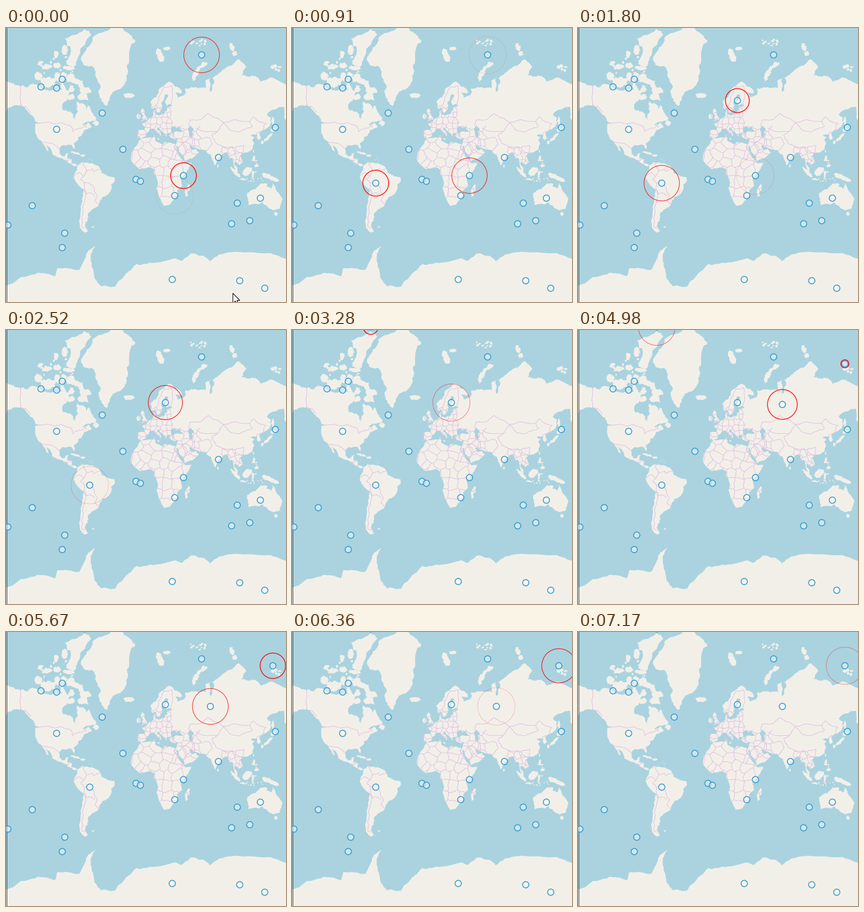
Animation, 448 px wide and 438 px high, one loop 7270 ms. Source, as a matplotlib script:

```python
import numpy as np
import matplotlib.pyplot as plt
from matplotlib.animation import FuncAnimation
from matplotlib.collections import LineCollection, PolyCollection
from matplotlib.patches import Circle, Polygon
from matplotlib.path import Path
from matplotlib.tri import Triangulation

W, H, DPI = 448, 438, 100
PX = 72 / DPI                      # one pixel in points
LOOP, FRAMES = 7270, 84
STEP = LOOP / FRAMES
PULSE = 2730                       # life of one ring in ms

SEA, LAND, BORDER, RING, EDGE = "#aad3df", "#f2efe9", "#dcb6e0", "#3399cc", "#4a4a4a"
rng = np.random.default_rng(4)
lands, lines = [], []


def project(*coords):
    """Web Mercator, flat lon/lat pairs to pixels."""
    lon, lat = np.array(coords, float).reshape(-1, 2).T
    y = np.arcsinh(np.tan(np.radians(lat)))
    return np.column_stack([224 + lon * 512 / 360, 231.5 - y * 256 / np.pi])


def roughen(p, amp, rounds=3):
    """Midpoint displacement along a polyline."""
    for _ in range(rounds):
        d = np.diff(p, axis=0)
        size = np.hypot(*d.T)
        push = rng.normal(0, amp, len(d)) * np.minimum(size, 12) / np.maximum(size, 1e-6)
        mid = (p[:-1] + p[1:]) / 2 + np.column_stack([-d[:, 1], d[:, 0]]) * push[:, None]
        out = np.empty((len(p) + len(mid), 2))
        out[::2], out[1::2] = p, mid
        p = out
    return p


def land(*coords, amp=.08):
    p = project(*coords)
    lands.append(roughen(np.vstack([p, p[:1]]), amp))


def blob(x, y, rx, ry, tilt=0):
    """Ragged ellipse in pixels."""
    a = np.linspace(0, 2 * np.pi, 10)
    r = rng.uniform(.85, 1.15, 10)
    r[-1] = r[0]
    u, v, t = rx * r * np.cos(a), ry * r * np.sin(a), np.radians(tilt)
    p = np.column_stack([x + u * np.cos(t) - v * np.sin(t), y + u * np.sin(t) + v * np.cos(t)])
    return roughen(p, .14, 2)


def isles(*rows):
    lands.extend(blob(*row) for row in rows)


def scatter(x, y, sx, sy, n, size):
    """Archipelago of small islands."""
    for _ in range(n):
        rx, ry = rng.uniform(.4, 1, 2) * size
        lands.append(blob(x + rng.uniform(-sx, sx), y + rng.uniform(-sy, sy), rx, ry))


def border(*coords):
    lines.append(roughen(project(*coords), .07))


def mesh(x0, x1, y0, y1, step):
    """Country-like cells: Voronoi edges of a jittered grid."""
    gx, gy = np.meshgrid(np.arange(x0, x1 + step, step), np.arange(y0, y1 + step, step))
    x, y = (g.ravel() + rng.uniform(-.38, .38, g.size) * step for g in (gx, gy))
    tri = Triangulation(x, y)
    (ax_, bx, cx), (ay, by, cy) = x[tri.triangles].T, y[tri.triangles].T
    a, b, c = ax_ ** 2 + ay ** 2, bx ** 2 + by ** 2, cx ** 2 + cy ** 2
    d = 2 * (ax_ * (by - cy) + bx * (cy - ay) + cx * (ay - by))
    hubs = np.column_stack([(a * (by - cy) + b * (cy - ay) + c * (ay - by)) / d,
                            (a * (cx - bx) + b * (ax_ - cx) + c * (bx - ax_)) / d])
    ok = np.all((hubs > (x0, y0)) & (hubs < (x1, y1)), axis=1)
    for i, row in enumerate(tri.neighbors):
        for j in row[row > i]:
            if ok[i] and ok[j]:
                lines.append(roughen(hubs[[i, j]], .09))


def on_land(segments):
    mid = segments.mean(axis=1)
    inside = np.zeros(len(mid), bool)
    for p in lands:
        inside |= Path(p).contains_points(mid)
    return segments[inside]


# North America, northern then southern half
land(-170, 66, -163, 69, -156.6, 71.3, -136, 68.9, -128, 70.3, -115, 67.9, -108, 67.4, -98, 67.8,
     -94.5, 68, -96, 70, -94.5, 71.9, -90.5, 68.6, -87.5, 67.4, -85.5, 69.7, -81.5, 69.4, -81.5, 67,
     -87, 65.6, -94.5, 60.5, -93, 57.3, -82.5, 55.2, -82, 52.9, -79.5, 51.3, -79.5, 54.5,
     -76.7, 56.5, -78, 62.4, -70, 61, -67.5, 58.3, -64.5, 60.3, -62, 57.5, -55.7, 52.2, -59, 50.2,
     -67, 49.5, -75, 45, -122.5, 48.5, -130, 54.5, -136, 58.5, -145, 60.3, -151, 59.3, -154, 59,
     -163, 54.6, -157.3, 58.7, -170, 60, amp=.11)
land(-71, 47, -65, 49.2, -61, 45.8, -70, 43, -70, 41.7, -76, 37.5, -76, 35, -81, 31.5, -80.2, 25.3,
     -82.7, 28, -84, 30, -89.3, 29.5, -94, 29.6, -97.3, 27, -97.5, 21.5, -94.5, 18.2, -91, 18.8,
     -90.2, 21, -87, 21.3, -88.6, 15.9, -83.3, 15, -83.5, 11, -77.3, 8.5, -80.2, 7.4, -85.7, 10.5,
     -94, 16, -105.5, 20.4, -105.5, 22.8, -113.1, 31.4, -109.6, 23.2, -112, 25, -117.2, 32.8,
     -122, 36.8, -124.3, 40.4, -124.4, 48.3, -95, 50)
# Greenland, Ellesmere, Baffin
land(-73, 78.2, -68, 76, -58, 75.5, -55, 72, -51, 69.5, -53.7, 67, -51.5, 64, -44, 59.9, -40, 65,
     -24, 70, -20, 74.5, -18, 80, -12, 81.5, -32, 83.6, -60, 82, -67, 80.2, amp=.11)
land(-89.5, 76.4, -79, 76.3, -75, 78.6, -61.5, 82.4, -70, 83.1, -91, 81.8, -85, 79, amp=.14)
land(-82, 73.7, -71, 71.3, -61.5, 66.6, -67, 66, -64.8, 62.7, -72, 62.9, -78, 64.4, -73, 66.5,
     -79, 70, -89, 70.8, -86, 73.7, amp=.15)
# South America
land(-77.3, 8.5, -71.7, 12, -62, 10.7, -51.5, 4.5, -50, 0, -44.5, -2.6, -35.2, -5.5, -35, -9,
     -39, -13.5, -39.5, -19, -42, -23, -48.5, -26, -53.5, -34.3, -57, -36.5, -62, -39, -65.3, -42,
     -65.8, -47.5, -69, -51, -65.3, -54.8, -69, -55.5, -74, -52.5, -75.3, -47, -73.5, -40,
     -71.5, -31, -70.3, -18.4, -76, -14, -81.2, -5.5, -80.5, -1, -77.5, 3.5)
# Scandinavia, western and central Europe
land(31, 70, 25.8, 71, 15, 68.3, 11, 64.3, 5, 62, 5.5, 58.7, 8, 58.1, 10.5, 59.2, 13, 55.4, 16.3, 56.8,
     18.8, 60, 17.5, 62, 22, 65.8, 25, 65.3, 21.4, 62, 23, 59.9, 33, 60.3, 33, 67)
land(30, 59.9, 23.5, 59.2, 24, 57.3, 21, 57, 21, 55, 14.2, 53.9, 9.8, 55, 10.5, 57.6, 8.2, 56.5,
     8.5, 53.9, 4.5, 52.3, 1.6, 50.4, -1.6, 49.2, -4.7, 48.4, -1.2, 46, -1.6, 43.4, -9, 43.3, -9.3, 38.7,
     -8.9, 37, -5.5, 36.1, -1, 37.5, 3.2, 42, 3.5, 43.3, 8.8, 44.4, 15.6, 40, 15.8, 38, 17, 40,
     12.4, 44.3, 13.5, 45.7, 19.3, 41.5, 22.6, 36.6, 23.5, 40.3, 28.5, 41.2, 28, 43.3, 31, 46.3,
     34, 44.5, 39, 47, 38, 44.7, 41.5, 41.7, 50, 44, 50, 60)
land(-5.5, 50.1, 1.3, 51.2, 1.5, 52.7, -1.8, 55.5, -2.2, 57.5, -4, 58.6, -6, 56.6, -3, 54, -4.7, 52.4, -3, 51.3)
# Northern, southern and eastern Asia
land(29, 69.8, 40, 67.4, 40, 66.3, 33, 66.6, 36, 64, 44, 66.1, 44, 68.4, 53.5, 68.8, 67.5, 68.5, 67, 71.5,
     72.8, 72.8, 72, 67, 74.5, 68, 74.5, 72.3, 81, 73.6, 87, 75, 104, 77.7, 113, 75.8, 107, 73.3,
     123, 73, 129, 71, 140, 72.5, 165, 69, 165, 61, 135, 55.5, 100, 48, 50, 48, 30, 55, amp=.11)
land(41.5, 41.7, 33, 42, 26.5, 39.8, 27.5, 36.8, 36, 36.5, 34.5, 31.3, 32.5, 30, 34.2, 27.8, 35, 29.5,
     39.2, 21, 43.4, 12.7, 52, 16, 59.7, 22.5, 56.3, 26, 51.5, 24.6, 48, 29.5, 51, 29, 57, 26.5, 61.5, 25.1,
     66.7, 25, 70, 21, 72.8, 20, 74.4, 14.5, 77.5, 8.1, 80, 13, 82, 16.7, 87, 21.3, 91.5, 22.4,
     100, 30, 95, 52, 50, 55)
land(91.5, 22.4, 94.3, 16, 97, 16.9, 98.4, 9, 101.3, 2.9, 103.8, 1.4, 103, 5.5, 99.3, 10, 100.3, 13.3,
     104.9, 8.6, 109.2, 12, 106, 18.7, 107.5, 21.3, 113.5, 22.3, 119.8, 25.8, 121.9, 31, 119.3, 35,
     122.2, 37, 118, 39, 124.5, 39.7, 126.5, 34.4, 129.3, 36, 127.5, 39.6, 135.5, 44.3, 140.3, 48.5,
     141, 52.5, 136, 54.7, 143, 59.3, 155.5, 59.3, 156.5, 51, 165, 62, 130, 62, 90, 55, 85, 30)
# Africa, Australia, Antarctica
land(-6, 35.8, 3, 36.8, 10, 37.3, 10.5, 34, 19.5, 30.4, 21, 32.7, 32, 31.2, 35.5, 24, 37.3, 19, 43, 12.2,
     44.5, 10.4, 51.2, 11.9, 48, 4.5, 39, -5.5, 40.5, -14.5, 35, -19.5, 35.5, -23.5, 32.6, -27, 27, -33.6,
     20, -34.8, 18.2, -32, 15, -26.5, 11.9, -17.5, 13.7, -11, 9, -1, 9.5, 3.8, 4.3, 6.3, -7.5, 4.4,
     -13.2, 8.8, -17.3, 14.5, -16.5, 22, -10, 29.8, amp=.05)
land(114, -22, 115.5, -34, 124, -33, 131, -31.5, 136, -34.5, 143.5, -38.8, 150, -37.5, 153.4, -28,
     146.5, -19, 142.5, -10.8, 140.8, -17.4, 135.5, -15, 136.5, -12.2, 131, -12, 127, -14, 122, -18.2)
land(-165, -78, -150, -77, -140, -75.2, -120, -74, -102, -75, -100, -72.5, -75, -73, -68, -68.5,
     -65, -65.5, -57, -63.3, -62, -67, -61, -72, -58, -75.5, -50, -77.7, -35, -77.8, -20, -73.7,
     -11, -71, 20, -70, 33, -68.8, 39, -69.8, 50, -66.8, 65, -67.8, 72, -70, 82, -67.3, 100, -66,
     140, -66.6, 165, -70, 165, -82, -165, -82, amp=.06)

# Islands: x, y, half axes, tilt
isles((67, 86, 13, 9), (52, 77, 7, 7), (66, 62, 9, 4, -10), (82, 78, 5, 7), (92, 76, 5, 6), (82, 60, 6, 5),
      (101, 64, 10, 4), (94, 36, 5, 8), (80, 42, 4, 6), (55, 56, 5, 3, -30), (104, 110, 6, 5, -40),
      (246, 43, 5, 11, -20), (257, 33, 6, 3), (303, 75, 4, 10, 20), (313, 62, 11, 3.5, -35),
      (361, 30, 4, 7, -15), (366, 41, 4, 4))
isles((197, 108, 9, 4), (212, 141, 3.5, 4.5), (144, 152, 5, 4), (111, 200, 8, 1.5, 17), (123, 204, 4, 2),
      (237, 174, 1.2, 3), (244, 177, 2, 1.2), (139, 318, 2, 1), (290, 259, 3, 10, 17), (339, 221, 1.5, 2.4),
      (396, 197, 1, 2.3), (427, 149, 1.6, 8), (427, 163, 4, 3), (419, 175, 9, 2.4, -42), (410, 183, 2, 3))
isles((397, 208, 2, 5), (401, 220, 3.5, 2.5), (367, 231, 11, 2.8, 47), (380, 242, 7, 1.3, 6),
      (386, 229, 8.5, 6, -45), (395, 234, 2, 5.5), (398, 230, 4, 1), (423, 239, 15, 4, 24), (432, 297, 3, 3))
scatter(82, 65, 26, 22, 24, 2.5)
scatter(306, 24, 15, 5, 14, 2.5)
scatter(429, 63, 9, 5, 7, 3.5)
scatter(398, 214, 4, 4, 6, 1.5)
scatter(400, 242, 16, 4, 12, 1.5)
scatter(136, 208, 5, 6, 6, .7)
scatter(265, 172, 4, 4, 6, .8)

# Long frontiers
border(-123, 49, -95, 49, -84.5, 46.5, -82.5, 42, -75, 45, -71.5, 45, -68, 47.3, -67, 45)
border(-141, 69.6, -141, 60.2, -135.5, 59.7, -130, 55.9)
border(-117, 32.5, -107, 31.6, -102.5, 29.7, -97.2, 25.9)
border(-71.5, 12, -67, 3, -70, -4, -73.5, -7.5, -69.5, -11, -60, -14, -58, -20, -54.5, -25, -57.6, -30.2, -53.4, -33.7)
border(-70.4, -18.3, -67.5, -23, -70, -33, -72, -45, -72, -52, -68.4, -52.4)
border(-69.5, -11, -69.5, -17.5, -67.5, -23, -62.5, -22, -57.8, -25.2)
border(-67, 2, -60, 4.5, -59, 1.5, -51.7, 4.2)
border(-70, -4, -75.3, 0, -80.3, -3.4)
border(12, 60, 14, 64.5, 20.5, 69, 29, 69.5, 30, 65, 28, 60.6)
border(48, 46, 50, 51, 61, 51, 70, 55.3, 87.3, 49.1, 80, 42.2, 66, 42, 56, 45)
border(87.3, 49.1, 98, 51, 116.7, 49.8, 121, 53, 128, 49.5, 135, 48.4, 130.6, 42.5, 124.3, 40)
border(87.3, 49.1, 96, 42.7, 105, 41.6, 119.8, 46.7, 116.7, 49.8)
border(80, 42.2, 74, 39, 78.8, 31.5, 88, 27.8, 97.3, 28.2, 101, 21.5, 108, 21.6)
border(61.2, 35.5, 71.5, 36.4, 74.5, 31, 68.2, 23.8)
mesh(196, 302, 172, 276, 15.5)
mesh(210, 270, 122, 176, 8.5)
mesh(264, 318, 156, 214, 13)
mesh(340, 382, 184, 222, 11)
mesh(86, 110, 206, 228, 8)

# Figure
fig = plt.figure(figsize=(W / DPI, H / DPI), dpi=DPI, facecolor=SEA)
ax = fig.add_axes([0, 0, 1, 1], xlim=(0, W), ylim=(H, 0))
ax.axis("off")
pieces = on_land(np.concatenate([np.stack([p[:-1], p[1:]], axis=1) for p in lines]))
caspian = blob(295.5, 165, 3.6, 9.5, -8)
for polys, color in ((lands, LAND), ([caspian], SEA)):
    ax.add_collection(PolyCollection(polys, facecolor=color, edgecolor="none"), autolim=False)
ax.add_collection(LineCollection(pieces, colors=BORDER, linewidths=.75 * PX), autolim=False)
ax.plot([.5, .5, W], [0, H - .5, H - .5], color=EDGE, lw=PX, zorder=3)


def dot(x, y):
    return ax.add_patch(Circle((x, y), 5, fc=(1, 1, 1, .45), ec=RING, lw=1.35 * PX, zorder=4))


for x, y in ((90, 82), (56, 94), (81, 96), (154, 136), (81, 162), (187, 194), (340, 207),
             (431, 159), (208, 242), (215, 245), (407, 272), (42, 284), (370, 280), (390, 308),
             (361, 313), (3, 315), (94, 328), (90, 351), (266, 402), (374, 404), (414, 416)):
    dot(x, y)

# x, y, birth time in ms
EVENTS = [(270, 268, -2580), (313, 43, -1665), (284, 236, -760), (134, 248, 100),
          (255, 116, 1070), (126, -5, 2920), (327, 119, 3915), (427, 54, 4880)]
pulses = [(born, dot(x, y), ax.add_patch(Circle((x, y), 5, fill=False, zorder=5)))
          for x, y, born in EVENTS]

tip = np.array([(0, 0), (0, 16), (4, 12.5), (6.5, 18.5), (9, 17.5), (6.5, 11.5), (11, 11.5)])
cursor = ax.add_patch(Polygon(tip + (363, 424), fc="white", ec="black", lw=PX, zorder=6))


def ease_out(t):
    return 1 - (1 - t) ** 3


def update(i):
    now = i * STEP
    for born, spot, ring in pulses:
        p = (now - born) / PULSE
        spot.set_visible(p >= 0)
        ring.set_visible(0 <= p < 1)
        if 0 <= p < 1:
            alpha = ease_out(1 - p)
            ring.set_radius(5 + 25 * ease_out(p))
            ring.set_edgecolor((1, 0, 0, alpha))
            ring.set_linewidth((.25 + alpha) * PX)
    cursor.set_visible(i == 0)
    return []


anim = FuncAnimation(fig, update, frames=FRAMES, interval=STEP, repeat=True, repeat_delay=0,
                     cache_frame_data=False)
plt.show()
```
